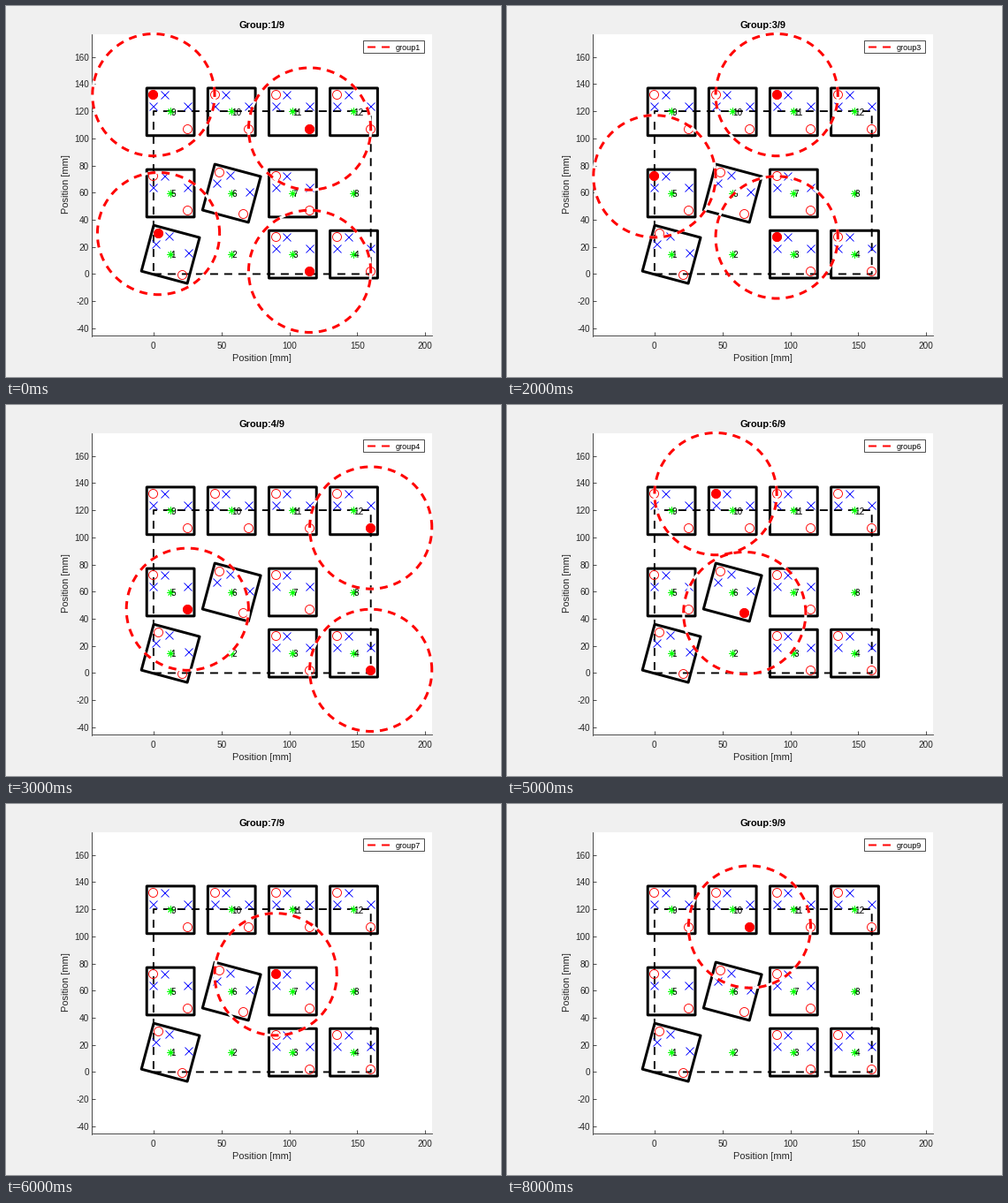
Animation, 560 px wide and 420 px high, one loop 9 s. Source, as a matplotlib script:

```python
import matplotlib.pyplot as plt
import numpy as np
from matplotlib.animation import FuncAnimation
from matplotlib.patches import Rectangle
from matplotlib.transforms import ScaledTranslation

W, H, DPI = 560, 420, 80
PX = 72 / DPI  # one pixel in points
INK = "#262626"
RED, GREEN, BLUE = "#ff0000", "#00ff00", "#0000ff"

plt.rcParams.update({
    "font.family": "Liberation Sans",
    "axes.unicode_minus": False,
    "lines.scale_dashes": False,
})

RADIUS = 45
HALF = 17.5
TILT = np.radians(-15)
COLS = [12.5, 57.5, 102.5, 147.5]
ROWS = [14.5, 59.5, 119.5]
EMPTY, TILTED = {2, 8}, {1, 6}

# module number and hole (A upper left, B lower right) used by each group
GROUPS = [
    "1A 3B 9A 11B", "1B 4A 9B 12A", "3A 5A 11A",
    "4B 5B 12B", "6A", "6B 10A", "7A", "7B", "10B",
]

CORNERS = HALF * np.array([(-1, -1), (1, -1), (1, 1), (-1, 1)])
HOLES = np.array([(-12.5, 12.5), (12.5, -12.5)])
CROSSES = np.array([(-4.2, 12.5), (-12.5, 4.2), (12.5, 4.2)])

centers = {4 * r + c + 1: np.array((x, y))
           for r, y in enumerate(ROWS) for c, x in enumerate(COLS)}


def place(num, pts):
    a = TILT if num in TILTED else 0
    rot = np.array([(np.cos(a), np.sin(a)), (-np.sin(a), np.cos(a))])
    return pts @ rot + centers[num]


def hole(code):
    return place(int(code[:-1]), HOLES)["AB".index(code[-1])]


fig = plt.figure(figsize=(W / DPI, H / DPI), dpi=DPI, facecolor="#f0f0f0")

# plot area, equal scale on both axes
X0, X1, Y1 = -45, 205, 177
Y0 = hole("1B")[1] - RADIUS
bottom, height = 0.11, 0.815
width = height * H * (X1 - X0) / (Y1 - Y0) / W
left = 0.13 + (0.775 - width) / 2

ax = fig.add_axes([left, bottom, width, height], facecolor="white")
ax.set(xlim=(X0, X1), ylim=(Y0, Y1))
ax.spines[["top", "right"]].set_visible(False)
# half a pixel up and left, so that snapping rounds down
for side, shift in (("left", 0.5), ("bottom", -0.5)):
    ax.spines[side].set_position(("outward", shift * PX))
    ax.spines[side].set(color=INK, linewidth=0.8 * PX)
ax.set(xticks=range(0, 201, 50), yticks=range(-40, 161, 20))
ax.tick_params(direction="in", length=4 * PX, width=0.8 * PX, color=INK,
               labelcolor=INK, labelsize=10 * PX)
ax.tick_params(axis="x", pad=6.5 * PX)
ax.tick_params(axis="y", pad=3.5 * PX)
snapped = ax.transData + ScaledTranslation(-0.5 / DPI, 0.5 / DPI,
                                           fig.dpi_scale_trans)


def dashes(lw):
    return dict(lw=lw * PX, ls=(0, (9 * PX, 7 * PX)), dash_capstyle="butt",
                snap=False)


def marks(pts, marker, size, color, fill="none", zorder=4):
    x, y = np.transpose(pts)
    return ax.plot(x, y, ls="", marker=marker, ms=size * PX, mec=color,
                   mfc=fill, mew=0.9 * PX, zorder=zorder,
                   transform=snapped)[0]


for num, center in centers.items():
    if num not in EMPTY:
        ax.fill(*place(num, CORNERS).T, fc="none", ec="black", lw=3 * PX,
                joinstyle="round", snap=False, zorder=3)
        marks(place(num, HOLES), "o", 10, RED)
        marks(place(num, CROSSES), "x", 9, BLUE)
    marks([center], (8, 2, 0), 8, GREEN)
    ax.text(*center, str(num), size=10 * PX, va="center_baseline", zorder=5)

ax.plot([0, 160, 160, 0, 0], [0, 0, 120, 120, 0], color="black",
        zorder=3, **dashes(1.9))

filled = marks([(0, 0)], "o", 10, RED, fill=RED, zorder=5)
halo, = ax.plot([], [], color="white", lw=3 * PX, zorder=6, clip_on=False)
ring, = ax.plot([], [], color=RED, zorder=7, clip_on=False, **dashes(3))

# overlay in pixel coordinates for titles and legend
top = fig.add_axes([0, 0, 1, 1], facecolor="none")
top.set(xlim=(0, W), ylim=(H, 0))
top.axis("off")
mid = (left + width / 2) * W
title = top.text(mid, 25, "", size=11 * PX, weight="bold", ha="center")
top.text(mid, 402.5, "Position [mm]", size=11 * PX, color=INK, ha="center")
top.text(73, 202, "Position [mm]", size=11 * PX, color=INK, rotation=90,
         ha="right", va="center")
top.add_patch(Rectangle((404, 39), 69, 14, fc="white", ec=INK,
                        lw=0.8 * PX))
top.plot([409, 436], [46.5, 46.5], color=RED, **dashes(2))
entry = top.text(441, 50, "", size=9 * PX)

angle = np.linspace(0, 2 * np.pi, 181)
circle = RADIUS * np.column_stack((np.cos(angle), np.sin(angle)))
GAP = np.full((1, 2), np.nan)


def update(i):
    pts = np.array([hole(code) for code in GROUPS[i].split()])
    path = np.vstack([np.vstack((p + circle, GAP)) for p in pts])
    filled.set_data(*pts.T)
    halo.set_data(*path.T)
    ring.set_data(*path.T)
    title.set_text(f"Group:{i + 1}/{len(GROUPS)}")
    entry.set_text(f"group{i + 1}")
    return filled, halo, ring, title, entry


anim = FuncAnimation(fig, update, frames=len(GROUPS), interval=1000,
                     repeat=True, repeat_delay=0, blit=False)
plt.show()
```
